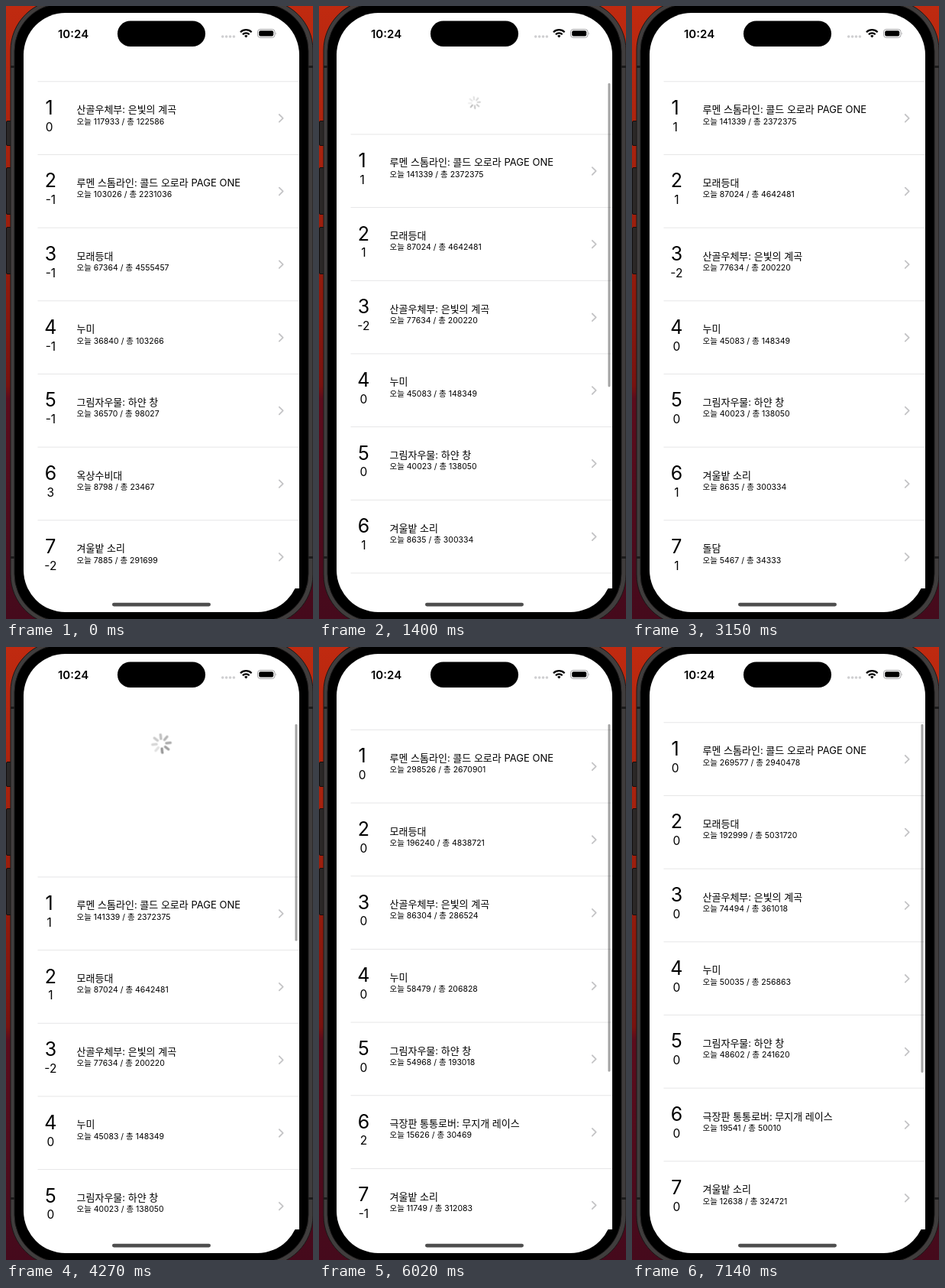
An HTML page for the animation above (8000 ms loop, 402 px wide and 802 px high).

```html
<!DOCTYPE html>
<html lang="ko">
<head>
<meta charset="utf-8">
<title>Box office</title>
<style>
  html, body { margin: 0; width: 100%; height: 100%; overflow: hidden; background: #000; }
  svg { display: block; width: 100%; height: 100%; }
  text { font-family: Inter, "Noto Sans CJK KR", "Noto Sans CJK", sans-serif; fill: #000; }
  .rank { font-size: 25px; text-anchor: middle; }
  .delta { font-size: 15.5px; text-anchor: middle; }
  .title { font-size: 13px; }
  .count { font-size: 10.5px; }
  .clock { font-size: 15px; font-weight: 600; }
  .sep { stroke: #e6e6e7; }
  .chevron { fill: none; stroke: #c4c4c6; stroke-width: 1.8; stroke-linecap: round; stroke-linejoin: round; }
  .spoke { stroke: #868686; stroke-width: 3.3; stroke-linecap: round; }
</style>
</head>
<body>
<svg viewBox="0 0 402 802" xmlns="http://www.w3.org/2000/svg">
  <defs>
    <linearGradient id="wall" x2="0" y2="1">
      <stop offset="0" stop-color="#c02a10"/>
      <stop offset=".4" stop-color="#981d0c"/>
      <stop offset=".62" stop-color="#78120f"/>
      <stop offset=".64" stop-color="#5c0c1c"/>
      <stop offset="1" stop-color="#450a1c"/>
    </linearGradient>
    <clipPath id="view"><rect x="41" y="98" width="343" height="664"/></clipPath>
  </defs>

  <rect width="402" height="802" fill="url(#wall)"/>
  <g fill="#2b2827" stroke="#121010">
    <rect x="0.5" y="150.5" width="9" height="32" rx="1.5"/>
    <rect x="0.5" y="211.5" width="9" height="61" rx="1.5"/>
    <rect x="0.5" y="289.5" width="9" height="61" rx="1.5"/>
  </g>
  <rect x="6" y="-8" width="396" height="818" rx="66" fill="#403d3d" stroke="#1a1818"/>
  <path d="M6 79.5h6M6 721.5h6M396 79.5h6M396 721.5h6" stroke="#1c1b1b" stroke-width="3"/>
  <rect x="11" y="-3" width="385" height="808" rx="62" stroke="#1d1c1c"/>
  <rect x="23" y="9" width="361" height="784" rx="55" fill="#fff"/>

  <text class="clock" x="68" y="41.5">10:24</text>
  <rect x="146" y="19.5" width="115" height="33.5" rx="16.7"/>
  <g fill="#cfcfd1">
    <circle cx="283.7" cy="40" r="1.8"/><circle cx="288.6" cy="40" r="1.8"/>
    <circle cx="293.5" cy="40" r="1.8"/><circle cx="298.4" cy="40" r="1.8"/>
  </g>
  <g fill="none" stroke="#000" stroke-width="2.2">
    <path d="M307 34.2a10.4 10.4 0 0 1 14.6 0M309.9 37.2a6.2 6.2 0 0 1 8.8 0"/>
    <path d="M314.3 41.4l-2.2-2.3a3.2 3.2 0 0 1 4.4 0z" fill="#000" stroke="none"/>
  </g>
  <rect x="329.5" y="30.5" width="22.5" height="10.8" rx="3.4" fill="none" stroke="#a2a2a4"/>
  <rect x="331.2" y="32.2" width="19" height="7.4" rx="2"/>
  <path d="M353.3 34.2q1.5 1.7 0 3.4z" fill="#a2a2a4"/>

  <g clip-path="url(#view)">
    <g transform="translate(203.5 126.5)">
      <g id="pull"></g>
      <g id="fade"><g id="spin"></g></g>
    </g>
    <g id="list"><rect x="41" y="98" width="343" height="800" fill="#fff"/></g>
  </g>
  <rect id="bar" x="378.5" y="101" width="2.9" height="456" rx="1.45" fill="#000" fill-opacity=".36"/>
  <rect x="139" y="780.7" width="129" height="4.8" rx="2.4" fill="#4e4e4e"/>
</svg>

<script>
const LOOP = 8000, TOP = 98.5, ROW = 95.67, BAR = 456;
const $ = id => document.getElementById(id);

// Rank and total before the first day, then the audience of each day
const films = [
  ['산골우체부: 은빛의 계곡', 1, 4653, [117933, 77634, 86304, 74494]],
  ['루멘 스톰라인: 콜드 오로라 PAGE ONE', 1, 2128010, [103026, 141339, 298526, 269577]],
  ['모래등대', 2, 4488093, [67364, 87024, 196240, 192999]],
  ['누미', 3, 66426, [36840, 45083, 58479, 50035]],
  ['그림자우물: 하얀 창', 4, 61457, [36570, 40023, 54968, 48602]],
  ['겨울밭 소리', 5, 283814, [7885, 8635, 11749, 12638]],
  ['돌담', 8, 28866, [0, 5467, 0, 0]],
  ['극장판 통통로버: 무지개 레이스', 9, 14843, [0, 0, 15626, 19541]],
  ['옥상수비대', 9, 14669, [8798, 0, 0, 0]]
].map(([title, rank, total, daily]) => ({ title, rank, total, daily }));

const gestures = [
  { start: 280, release: 1150, end: 1890, pull: 194 },
  { start: 3710, release: 4270, end: 5040, pull: 202.5 },
  { start: 5950, release: 6400, end: 7140, pull: 191 }
].map(g => ({ ...g, trigger: g.start + (g.release - g.start) * 0.76, loaded: g.release + 150 }));

const swipe = 'ease-in-out', lag = 'cubic-bezier(.7,0,.95,.45)', spring = 'cubic-bezier(.25,.35,.3,1)';

function add(parent, tag, attrs, text) {
  const el = document.createElementNS('http://www.w3.org/2000/svg', tag);
  for (const k in attrs) el.setAttribute(k, attrs[k]);
  if (text !== undefined) el.textContent = text;
  parent.append(el);
  return el;
}

// Steps are [ms, value, easing to the next step]
function loop(el, prop, steps) {
  const frames = steps.map(([ms, value, easing = 'linear']) => ({ offset: ms / LOOP, [prop]: value, easing }));
  frames.unshift({ ...frames[0], offset: 0, easing: 'step-end' });
  frames.push({ ...frames[frames.length - 1], offset: 1 });
  el.animate(frames, { duration: LOOP, iterations: Infinity });
}
const eachPull = (el, prop, steps) => loop(el, prop, gestures.flatMap(steps));

function drawRow(parent, i, film, day, delta) {
  const g = add(parent, 'g', { transform: `translate(0 ${TOP + i * ROW})` });
  const mid = i ? 58.4 : 56.6;
  add(g, 'line', { class: 'sep', x1: 41.5, x2: 384, y1: 0.3, y2: 0.3 });
  add(g, 'text', { class: 'rank', x: mid, y: 43.3 }, i + 1);
  add(g, 'text', { class: 'delta', x: mid, y: 65 }, delta);
  add(g, 'text', { class: 'title', x: 92.5, y: 41.8 }, film.title);
  add(g, 'text', { class: 'count', x: 92.5, y: 56 }, `오늘 ${film.daily[day]} / 총 ${film.total}`);
  add(g, 'path', { class: 'chevron', d: 'M357.8 43.5l4.9 4.8-4.9 4.8' });
}

// Each day sorts the films by audience and adds it to their totals
const swaps = [0, ...gestures.map(g => g.loaded), LOOP];
for (let day = 0; day < 4; day++) {
  const layer = add($('list'), 'g');
  [...films].sort((a, b) => b.daily[day] - a.daily[day]).forEach((film, i) => {
    film.total += film.daily[day];
    if (i < 7) drawRow(layer, i, film, day, film.rank - i - 1);
    film.rank = i + 1;
  });
  const first = day === 0, last = day === 3;
  loop(layer, 'opacity', [[0, +first, 'step-end'], [swaps[day], 1, 'step-end'], [swaps[day + 1], +last]]);
}

eachPull($('list'), 'transform', g => [
  [g.start, 'translateY(0px)', swipe], [g.release, `translateY(${g.pull}px)`, spring], [g.end, 'translateY(0px)']
]);
eachPull($('bar'), 'height', g => [
  [g.start, `${BAR}px`, lag], [g.release, `${BAR + 30 - g.pull}px`, spring], [g.end, `${BAR}px`]
]);
loop($('bar'), 'opacity', [
  [0, 0, 'step-end'], [280, 1], [2950, 1], [3150, 0, 'step-end'], [3710, 1]
]);

// Spokes appear one by one while pulling, then a graded wheel turns
for (let i = 0; i < 8; i++) {
  const spoke = { class: 'spoke', y1: -6.5, y2: -11.8 };
  const grey = add($('pull'), 'line', { ...spoke, transform: `rotate(${i * 45})` });
  eachPull(grey, 'opacity', ({ start, trigger }) => {
    const t = start + (trigger - start) * (0.4 + i * 0.06);
    return [[t, 0], [t + 30, 1], [trigger, 1, 'step-end'], [trigger + 1, 0]];
  });
  const behind = (10 - i) % 8;
  add($('spin'), 'line', { ...spoke, transform: `rotate(${i * 45 - 6})`, opacity: 0.88 - behind * 0.09 });
}
eachPull($('pull'), 'transform', ({ start, trigger }) => [
  [start, 'rotate(0deg)'], [trigger - 150, 'rotate(0deg)', 'ease-out'], [trigger - 40, 'rotate(22deg)']
]);
eachPull($('fade'), 'opacity', ({ trigger, loaded }) => [
  [trigger, 0, 'step-end'], [trigger + 1, 1], [loaded, 1], [loaded + 250, 0]
]);
eachPull($('fade'), 'transform', ({ trigger, loaded }) => [
  [trigger, 'scale(1)'], [loaded, 'scale(1)'], [loaded + 250, 'scale(.1)', 'step-end']
]);
$('spin').animate(
  { transform: ['rotate(0deg)', 'rotate(360deg)'] },
  { duration: 1000, iterations: Infinity, easing: 'steps(8)' }
);
</script>
</body>
</html>
```
